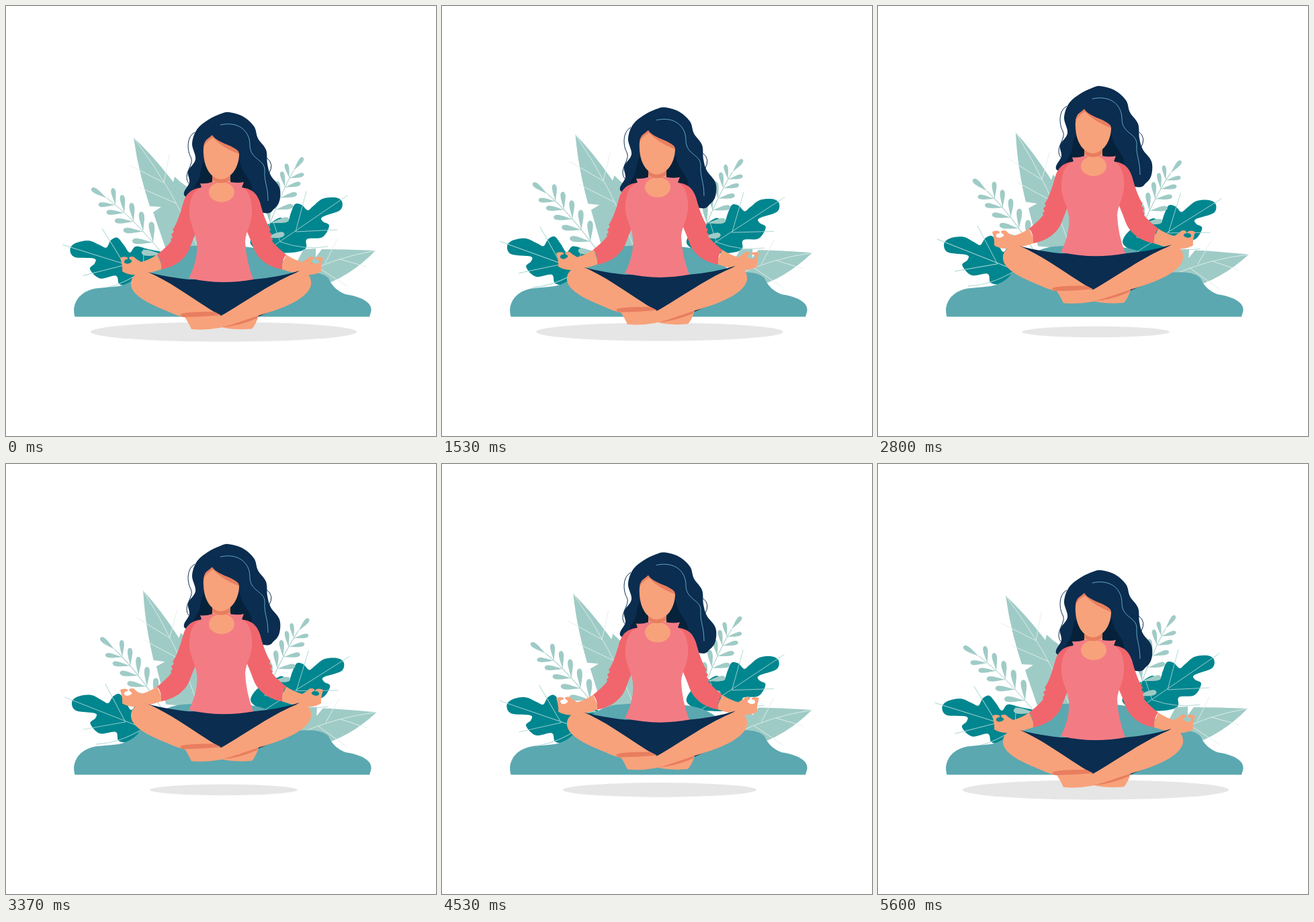
These frames come from a looping animation (640 px wide and 640 px high, 5.76 s). An HTML page:

```html
<!DOCTYPE html>
<html lang="en">
<head>
<meta charset="utf-8">
<title>Meditation</title>
<style>
  html, body { margin: 0; width: 100%; height: 100%; overflow: hidden; background: #fff; }
  svg { display: block; width: 100%; height: 100%; }
  .light { fill: #9fcbc6; }
  .dark { fill: #00868f; }
  .vein { fill: none; stroke: #e0efed; stroke-width: .9; stroke-linecap: round; }
  .faded { stroke: #a9d5d5; }
  .stem { fill: none; stroke: #9fcbc6; }
  .navy { fill: #0a2d50; }
  .strand { fill: none; stroke: #0a2d50; }
  .shine { fill: none; stroke: #6fb4cf; stroke-width: .9; }
  .deep { fill: #06213a; }
  .skin { fill: #f8a27b; }
  .tan { fill: #e87e5f; }
  .shirt { fill: #f37c84; }
  .sleeve { fill: #f1666c; }
</style>
</head>
<body>
<svg viewBox="0 0 640 640">
  <defs>
    <g id="arm">
      <path class="skin" d="M170 375Q175 372 181 374.5V377Q175 377 176 382Q181 386 187 381Q188 378 184 377L183 374Q190 371 193 376L201 381Q213 378 225 370L234 391Q207 400 195 400Q182 401 173 395Q174 388 170 375Z"/>
      <path class="sleeve" d="M292 270C276 272 269 278 264 292Q256 322 248 333L250 336L246 340L248 344L245 347L246 350Q240 358 225 370Q232 378 231 392C250 389 268 377 274 359Q278 348 284 334L290 300Z"/>
    </g>
    <g id="lobed">
      <path class="dark" data-curve="500,291 497,304 471,314 472,321 481,327 471,344 448,347 446,361 425,367 385,366 364,354 372,336 392,324 408,315 419,321 424,308 430,295 440,296 449,304 457,298 471,287 490,285"/>
      <path class="vein faded" d="M508 282Q445 325 385 366M447 276L431 336L493 333M479 358Q445 364 408 351L398 322"/>
    </g>
  </defs>

  <g id="tallLeaf">
    <path class="light" d="M190 196Q220 224 249 262L251 254L260 262L272 271L292 362H238L219 307L231 299L214 298Q197 247 190 196Z"/>
    <path class="vein" d="M190 196Q250 275 286 360M243 221L235 263L184 237M199 270L254 294"/>
  </g>
  <g id="lobedLeft">
    <use href="#lobed" transform="translate(99 363) rotate(-17) scale(-1.03 1.03) translate(-497 -293)"/>
  </g>
  <g id="branchLeft"></g>
  <g id="lobedRight"><use href="#lobed"/></g>
  <g id="lightRight">
    <path class="light" d="M550 364Q510 362 470 362L461 374V361L443 362L425 396L484 411Q520 395 550 364Z"/>
    <path class="vein" d="M550 364Q490 374 435 402M493 347L475 383M537 388L497 377M508 417L464 389"/>
  </g>
  <g id="branchRight"></g>

  <path fill="#5ba8b0" d="M102.500 462.500C97 445 108 423 137 420Q160 418 168 417Q186 413 196 402C207 383 232 361 262 358Q320 353 370 360Q405 366 430 397C447 396 470 394 480 405Q487 422 505 429C530 433 547 442 543 456L541 462.500Z"/>
  <ellipse id="shadow" cx="324" cy="485" fill="#e6e6e6"/>

  <g id="woman">
    <path class="navy" data-curve="318,161 331,158 352,164 369,179 375,197 387,214 389,235 394,252 407,270 407,290 399,302 384,308 330,290 268,284 273,262 271,246 282,228 277,205 284,184 300,170"/>
    <path class="strand" d="M281 188C269 194 269 214 275 225S262 250 272 264M388 226Q400 235 391 250"/>
    <path class="deep" d="M298 228C286 238 294 252 282 266L276 282L300 290L366 276C368 258 350 252 348 230Z"/>
    <path class="skin" d="M307 246H334V264L345 276H302L307 264Z"/>
    <use href="#arm"/>
    <use href="#arm" transform="matrix(-1 0 0 1 642 0)"/>

    <path class="navy" d="M372 464L420 443L435 420L380 440Z"/>
    <path class="navy" d="M207 395Q235 403 272 407H368Q405 404 437 394L320 462Z"/>
    <path class="skin" d="M209 395C194 396 185 403 186 415C188 432 215 444 242 455Q258 463 275 465L320 461C286 442 249 412 209 395Z"/>
    <path class="skin" d="M320 478L376 461Q372 474 366 480.500Q342 483 320 478Z"/>
    <path class="tan" d="M320 478L376 460L373 465Q345 477 320 478Z"/>
    <path class="skin" d="M437 395C450 396 455 404 454 415C450 434 418 448 385 458S340 474 318 479Q297 483 276 481Q269 466 263 459Q290 463 320 461C356 441 397 410 437 395Z"/>
    <path class="tan" d="M259 459Q265 455 310 455L320 460Q290 463 262 463Z"/>

    <path class="shirt" d="M289 264Q298 265 307 262H334Q345 264 354 262L351 270C363 275 367 292 366 309S357 335 356 350Q357 378 368 407Q320 416 272 405C280 390 286 370 284 352S273 325 273 308C273 291 277 275 291 270Z"/>
    <ellipse class="skin" cx="321" cy="277" rx="19" ry="15"/>
    <path class="tan" d="M307 252H334V259Q320 268 307 259Z"/>
    <path class="skin" d="M307 192C296 199 293 206 294 220C295 241 305 257 320 258C336 257 347 239 347 220L340 206Z"/>
    <path class="tan" d="M307 191Q294 200 294 210Q298 201 308 196Q322 211 346 220L348 212Z"/>
    <path class="navy" d="M307 192C315 205 341 207 347 218L360 210L340 178H300L290 204Q298 200 307 192Z"/>
    <path class="shine" d="M319 177C345 171 363 185 363 207S386 228 385 245S390 268 390 290"/>
  </g>
</svg>

<script>
const LOOP = 5760;
const $ = id => document.getElementById(id);

// Closed smooth curve through a few key points.
function smooth(pts) {
  const n = pts.length, p = i => pts[(i + n) % n];
  const handle = (i, dir) => p(i).map((v, k) => v + dir * (p(i + 1)[k] - p(i - 1)[k]) / 6);
  return `M${pts[0]}` + pts.map((_, i) => `C${handle(i, 1)} ${handle(i + 1, -1)} ${p(i + 1)}`).join('') + 'Z';
}

for (const path of document.querySelectorAll('[data-curve]')) {
  path.setAttribute('d', smooth(path.dataset.curve.split(' ').map(xy => xy.split(',').map(Number))));
}

// Teardrop of a given length, growing from base (x, y) at an angle in degrees.
function drop([x, y], len, deg) {
  const a = deg * Math.PI / 180, c = Math.cos(a) * len, s = Math.sin(a) * len, w = 0.15;
  const at = (u, v) => [x + c * u - s * v * w, y + s * u + c * v * w];
  return `M${at(0, 0)}C${at(.35, .4)} ${at(.6, 1)} ${at(.82, .9)}` +
    `C${at(1.06, .8)} ${at(1.06, -.8)} ${at(.82, -.9)}C${at(.6, -1)} ${at(.35, -.4)} ${at(0, 0)}Z`;
}

// One leaf at the tip, then pairs that grow larger down the stem.
function branch(id, [from, bend, to], [tip, upper, outer], size, grow) {
  const on = u => from.map((v, k) => (1 - u) ** 2 * v + 2 * u * (1 - u) * bend[k] + u * u * to[k]);
  let leaves = drop(from, size + 3, tip);
  for (let i = 1; i < 7; i++) {
    const base = on(i / 6), len = size + grow * i;
    if (i < 6) leaves += drop(base, len, upper + i);
    leaves += drop(base, len, outer + i);
  }
  $(id).innerHTML = `<path class="stem" d="M${from}Q${bend} ${to}"/><path class="light" d="${leaves}"/>`;
}

branch('branchLeft', [[150, 286], [188, 314], [234, 370]], [213, 260, 180], 24, 1.4);
branch('branchRight', [[428, 245], [410, 276], [385, 345]], [306, 256, 343], 21, 1.5);

const ease = (t, a, b) => {
  const u = Math.min(1, Math.max(0, (t - a) / (b - a)));
  return (1 - Math.cos(Math.PI * u)) / 2;
};
const swell = (t, a, b, c, d) => ease(t, a, b) - ease(t, c, d);

// Full swing in degrees and its pivot.
const plants = {
  tallLeaf: [5, 290, 362],
  lobedLeft: [4.3, 200, 395],
  branchLeft: [7, 243, 380],
  lobedRight: [2.2, 385, 366],
  lightRight: [3, 440, 400],
  branchRight: [4.4, 385, 345]
};

function draw(t) {
  const sway = swell(t, 0, 2780, 3000, 5600);
  const lift = 38.8 * swell(t, 1150, 2500, 3870, 5600);
  const rx = 198 - 88 * swell(t, 1145, 2615, 3770, 5550);
  for (const [id, [deg, x, y]] of Object.entries(plants)) {
    $(id).setAttribute('transform', `rotate(${deg * sway} ${x} ${y})`);
  }
  $('woman').setAttribute('transform', `translate(0 ${-lift})`);
  $('shadow').setAttribute('rx', rx);
  $('shadow').setAttribute('ry', rx * 0.074);
}

const start = performance.now();
function tick() {
  draw((performance.now() - start) % LOOP);
  requestAnimationFrame(tick);
}
tick();
</script>
</body>
</html>
```
